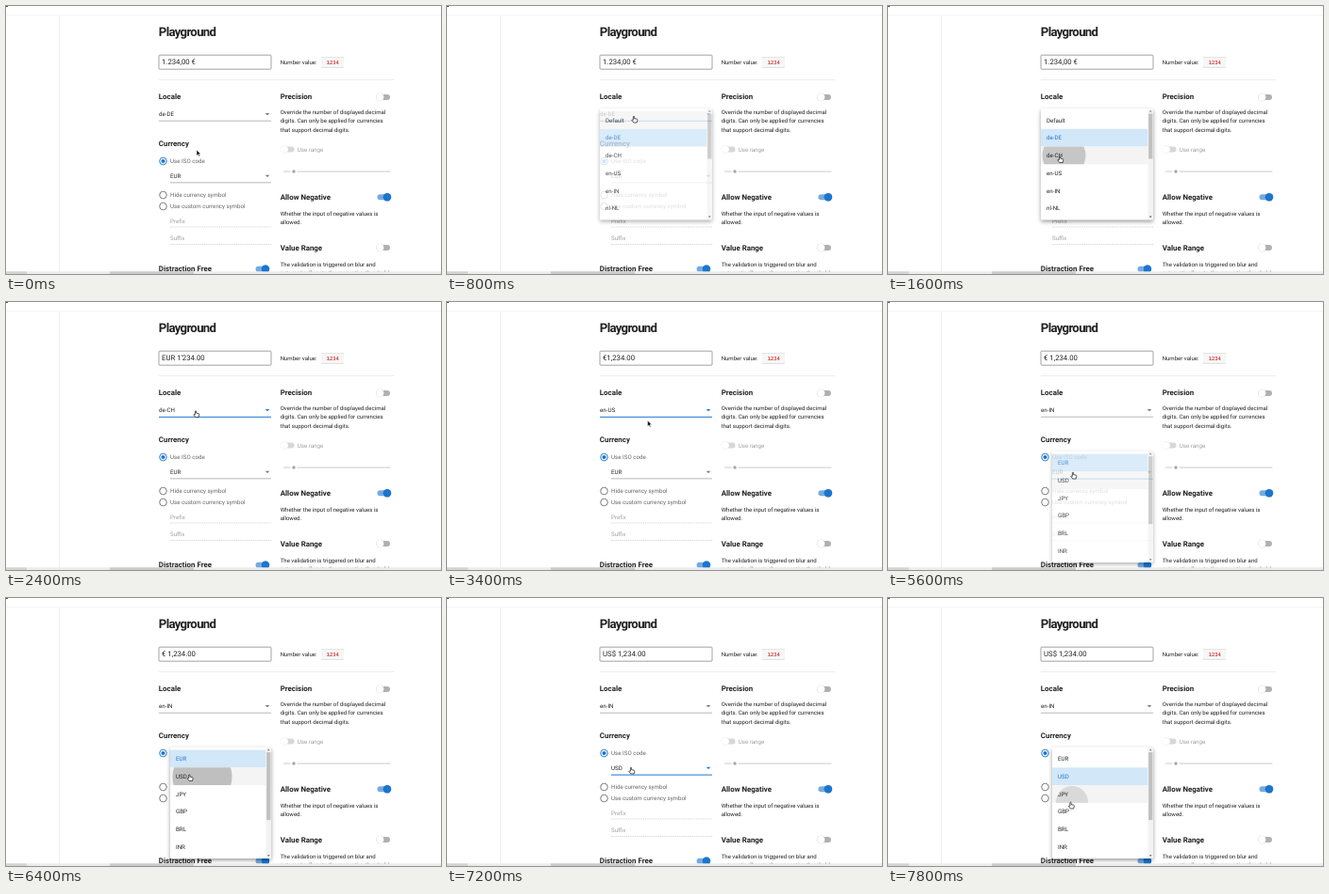
These frames come from a looping animation (461x285 px, 8 s). An HTML page:

```html
<!DOCTYPE html>
<html lang="en">
<head>
<meta charset="utf-8">
<title>Playground</title>
<style>
  html, body { margin: 0; width: 100%; height: 100%; overflow: hidden; background: #fff; }
  svg { display: block; width: 100%; height: 100%; }
  text { font: 6.2px Roboto, sans-serif; fill: #222; text-rendering: geometricPrecision; white-space: pre; }
  .title { font-size: 13.2px; font-weight: 700; letter-spacing: -.68px; }
  .head { font-size: 7.9px; font-weight: 700; }
  .value { font-size: 7.75px; }
  .body { font-size: 6.05px; }
  .label { fill: #666; }
  .muted { fill: #a0a0a0; }
  .code { font: 700 5.4px "Roboto Mono", "DejaVu Sans Mono", monospace; fill: #d0403f; }
  .chosen { fill: #1976d2; }
  .raised { filter: drop-shadow(0 .5px .7px rgba(0, 0, 0, .4)); }
  .sheet { filter: drop-shadow(0 2px 2px rgba(0, 0, 0, .38)); }
</style>
</head>
<body>
<svg viewBox="0 0 461 285">
  <g id="page"></g>
  <g id="live"></g>
  <g id="edge">
    <rect y="282.3" width="461" height="2.7" fill="#ececec"/>
    <rect y="282.3" width="22" height="2.7" fill="#d4d4d4"/>
    <rect x="110" y="282.3" width="89" height="2.7" fill="#cbcbcb"/>
  </g>
  <g id="pointer"></g>
</svg>
<script>
const LOOP = 8000, STEP = 200, ROW = 18.75;
const BLUE = '#1976d2';
const $ = id => document.getElementById(id);

const text = (x, y, s, cls = '') => `<text x="${x}" y="${y}" class="${cls}">${s}</text>`;
const rect = (x, y, w, h, fill, more = '') =>
  `<rect x="${x}" y="${y}" width="${w}" height="${h}" fill="${fill}" ${more}/>`;
const circle = (x, y, r, fill, more = '') =>
  `<circle cx="${x}" cy="${y}" r="${r}" fill="${fill}" ${more}/>`;
const triangle = (x, y, w, h, fill) =>
  `<path d="M${x - w} ${y}h${2 * w}l${-w} ${h}z" fill="${fill}"/>`;

const toggle = (x, y, on) =>
  rect(x - 6.5, y - 3, 13.5, 6, on ? '#74abe2' : '#b0b0b0', 'rx="3"') +
  circle(on ? x + 4 : x - 3.6, y, 4.2, on ? BLUE : '#fff', 'class="raised"');

const radio = (y, on) =>
  circle(166.5, y, 3.8, 'none', `stroke="${on ? BLUE : '#757575'}" stroke-width=".95"`) +
  (on ? circle(166.5, y, 2.1, BLUE) : '');

const select = (x, y, value, focused) =>
  text(x, y + 2.2, value) +
  rect(x, y + 7, 281 - x, focused ? 1 : .6, focused ? BLUE : '#858585') +
  triangle(277, y - .9, 2.3, 2.4, focused ? BLUE : '#757575');

const disabledField = (y, name) =>
  text(174, y + 2.2, name, 'muted') +
  `<path d="M174 ${y + 6.5}H281" stroke="#aaa" stroke-width=".6" stroke-dasharray=".8 1"/>`;

const lines = (y, ...rows) => rows.map((s, i) => text(290.7, y + i * 9.2, s, 'body')).join('');

$('page').innerHTML =
  rect(0, 0, 2, .8, '#222') +
  rect(0, 9.6, 461, .7, '#ededed') +
  rect(56, 10, .7, 273, '#e8e8e8') +
  text(161.8, 32.3, 'Playground', 'title') +
  rect(162, 52.2, 119, 15, '#fff', 'rx="1" stroke="#8c8c8c" stroke-width=".8"') +
  text(290.7, 61.7, 'Number value:', 'body') +
  rect(334, 54.2, 24, 11.2, '#f6f6f6', 'rx="1" class="raised"') +
  text(339.8, 61.7, '1234', 'code') +
  rect(162, 78, 249, .6, '#e2e2e2') +
  text(161.8, 99, 'Locale', 'head') +
  text(161.8, 149, 'Currency', 'head') +
  radio(165, true) + text(174, 167.2, 'Use ISO code', 'label') +
  radio(201, false) + text(174, 203.2, 'Hide currency symbol', 'label') +
  radio(213, false) + text(174, 215.2, 'Use custom currency symbol', 'label') +
  disabledField(228.5, 'Prefix') + disabledField(247, 'Suffix') +
  text(161.8, 282, 'Distraction Free', 'head') + toggle(271, 279.8, true) +
  text(290.7, 99, 'Precision', 'head') + toggle(400, 97, false) +
  lines(115.2, 'Override the number of displayed decimal',
    'digits. Can only be applied for currencies', 'that support decimal digits.') +
  `<g opacity=".5">${toggle(298.5, 152.5, false)}</g>` +
  text(308.7, 154.7, 'Use range', 'muted') +
  rect(294, 175.6, 7.5, .8, '#bdbdbd') + circle(305, 176, 1.7, '#a5a5a5') +
  rect(308.5, 175.6, 99, .8, '#bdbdbd') +
  text(290.7, 206.2, 'Allow Negative', 'head') + toggle(400, 203.3, true) +
  lines(223.2, 'Whether the input of negative values is', 'allowed.') +
  text(290.7, 260, 'Value Range', 'head') + toggle(400, 257, false) +
  lines(277.2, 'The validation is triggered on blur and',
    'automatically sets the respective threshold');

const menus = {
  locale: { x: 162, top: 109, thumb: 48, items: ['Default', 'de-DE', 'de-CH', 'en-US', 'en-IN', 'nl-NL'] },
  currency: { x: 174, top: 158.6, thumb: 72, items: ['EUR', 'USD', 'JPY', 'GBP', 'BRL', 'INR'] },
};

// Each visit opens a menu, presses one row, and takes effect one step later.
const visits = [
  { menu: 'locale', open: 800, press: 1600, from: 1, to: 2, result: "EUR 1'234.00", ripple: [186.5, 159, 23, '#c6c6c6'] },
  { menu: 'locale', open: 2600, press: 3000, from: 2, to: 3, result: '€1,234.00', ripple: [188, 177, 23, '#c6c6c6'] },
  { menu: 'locale', open: 3800, press: 4400, from: 3, to: 4, result: '€ 1,234.00', ripple: [199, 197, 23, '#c6c6c6'] },
  { menu: 'currency', open: 5600, press: 6400, from: 0, to: 1, result: 'US$ 1,234.00', ripple: [208, 190, 31.5, '#bfbfbf'] },
  { menu: 'currency', open: 7400, press: 7800, from: 1, to: 2, result: '', ripple: [195, 217, 17, '#d9d9d9'] },
];

// time, x, y of the pointer's tip
const path = [
  [0, 202, 153], [400, 200, 134], [600, 199, 117], [800, 198, 117], [1200, 184, 152],
  [1600, 182, 159.5], [1800, 182, 160], [2400, 201, 115.5], [2600, 201, 117], [3000, 184, 176],
  [3200, 187, 175], [3400, 212.5, 126], [3600, 206, 118], [3800, 204, 118], [4200, 196, 190],
  [4400, 195, 200], [4600, 195.5, 202.5], [4800, 196, 200], [5400, 196, 180], [5600, 196, 181],
  [6200, 194.5, 185], [6400, 194.3, 187.5], [6800, 195, 184], [7200, 195, 180], [7400, 195, 182],
  [7800, 193.5, 217], [8000, 193.5, 217],
];

function pointerAt(t) {
  const i = path.findIndex(p => p[0] > t);
  const [t0, x0, y0] = path[i - 1], [t1, x1, y1] = path[i];
  const k = (t - t0) / (t1 - t0);
  return [x0 + (x1 - x0) * k, y0 + (y1 - y0) * k];
}

function drawMenu(visit, t, pointerY) {
  const { x, top, thumb, items } = menus[visit.menu];
  const closing = t > visit.press;
  const selected = closing ? visit.to : visit.from;
  const first = top + 3, width = 275.5 - x;
  const hovered = closing ? -1 : Math.floor((pointerY - first) / ROW);
  const opacity = closing ? .22 : t === visit.open ? .8 : 1;
  let out = rect(x, top, 281 - x, 118.5, '#fff', 'rx="1.5" class="sheet"');
  items.forEach((item, i) => {
    const y = first + i * ROW;
    if (i === selected) out += rect(x, y, width, ROW, '#d2e7f8');
    else if (i === hovered) out += rect(x, y, width, ROW, '#f4f4f4');
    if (i === visit.to && t === visit.press) {
      const [cx, cy, r, fill] = visit.ripple;
      out += `<clipPath id="row">${rect(x, y, width, ROW, '#000')}</clipPath>` +
        circle(cx, cy, r, fill, 'clip-path="url(#row)"');
    }
    out += text(x + 6, y + ROW / 2 + 2.2, item, i === selected ? 'chosen' : '');
  });
  out += rect(275.5, top + .5, 5.5, 117.5, '#f3f3f3') +
    rect(276.1, top + 5.5, 4.3, thumb, '#c1c1c1') +
    triangle(278.2, top + 3.6, 1.4, -1.6, '#777') +
    triangle(278.2, top + 114.6, 1.4, 1.6, '#555');
  return `<g opacity="${opacity}">${out}</g>`;
}

function drawPointer(t, x, y) {
  const arrow = t < 600 || t === 3400;
  const shape = arrow
    ? '<path d="M0 0V6.2L1.5 4.9 2.5 7.1 3.5 6.7 2.5 4.5H4.5Z" fill="#111" stroke="#fff" stroke-width=".5"/>'
    : '<path d="M-.6 .5Q0-.4.6 .5V2.6L3.3 3.2Q4 3.4 3.8 4.4L3.2 7H-.2L-2.2 4.4Q-2.2 3.5-.6 4.3Z" fill="#fff" stroke="#222" stroke-width=".75"/>';
  return `<g transform="translate(${x} ${y})">${shape}</g>`;
}

function draw(t) {
  const [x, y] = pointerAt(t);
  let amount = '1.234,00 €', focus = '';
  const chosen = { locale: 1, currency: 0 };
  for (const v of visits) {
    if (t >= v.open) focus = v.menu;
    if (t > v.press) {
      amount = v.result;
      chosen[v.menu] = v.to;
    }
  }
  const field = (name, fy) =>
    select(menus[name].x, fy, menus[name].items[chosen[name]], focus === name);
  const active = visits.find(v => t >= v.open && t <= v.press + STEP);
  $('live').innerHTML = text(165, 62.3, amount, 'value') +
    field('locale', 114.8) + field('currency', 180.6) +
    (active ? drawMenu(active, t, y) : '');
  $('pointer').innerHTML = drawPointer(t, x, y);
}

let start, shown = -1;
function tick(now) {
  start ??= now;
  const t = Math.floor((now - start) % LOOP / STEP) * STEP;
  if (t !== shown) draw(shown = t);
  requestAnimationFrame(tick);
}
draw(0);
requestAnimationFrame(tick);
</script>
</body>
</html>
```
